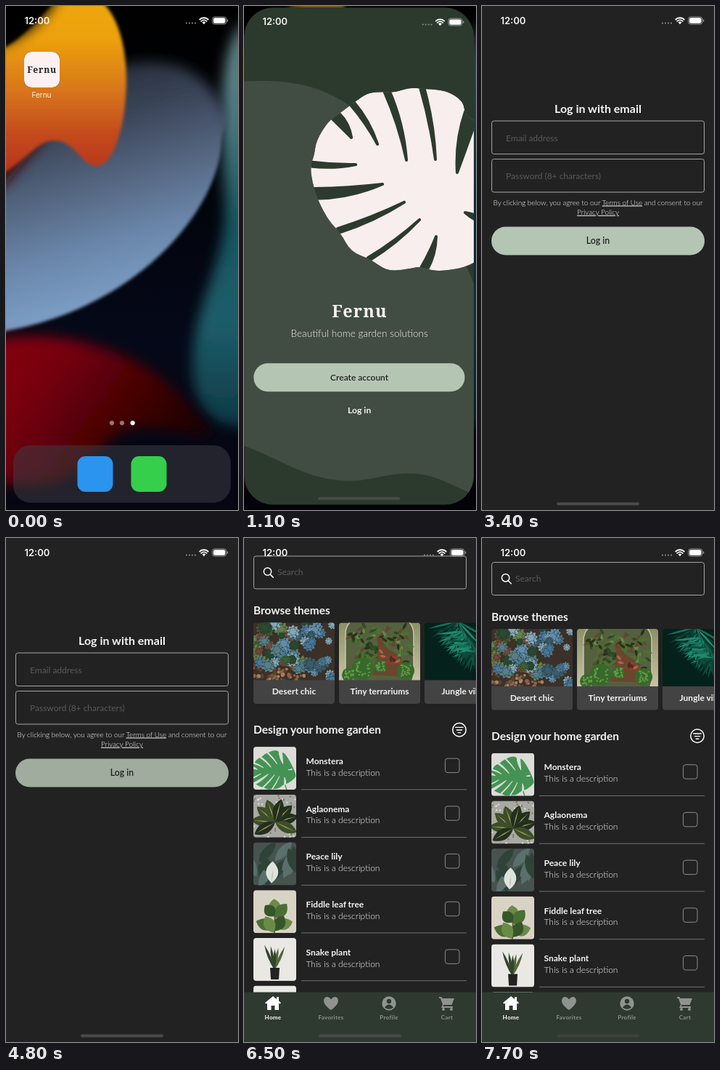
An HTML page that plays this animation: 320 by 693 pixels, repeating every 8000 ms.

```html
<!DOCTYPE html>
<html lang="en">
<head>
<meta charset="utf-8">
<title>Garden app</title>
<style>
html, body { margin: 0; height: 100%; overflow: hidden; background: #000; }
svg#stage { display: block; width: 100vw; height: 100vh; }
text { font-family: Lato, sans-serif; fill: #f4f4f2; }
.mid { text-anchor: middle; }
.bold { font-weight: 700; }
.light { font-weight: 300; }
.serif { font-family: "Noto Serif", serif; font-weight: 600; }
.sys { font-family: Inter, sans-serif; }
.dark { fill: #222; font-weight: 600; }
.hint { fill: #5a5a5a; }
.link { text-decoration: underline; }
.line { fill: none; stroke: #fff; stroke-linecap: round; stroke-linejoin: round; }
</style>
</head>
<body>
<svg id="stage" viewBox="0 0 320 693"></svg>
<script>
const BRAND = 'Fernu';
let seed = 11;
const rnd = (a = 0, b = 1) => a + (b - a) * ((seed = seed * 16807 % 2147483647) / 2147483647);
const pick = list => list[Math.floor(rnd(0, list.length))];
const times = (n, fn) => Array.from({ length: n }, (_, i) => fn(i)).join('');
const text = (x, y, size, cls, s, extra = '') =>
  `<text x="${x}" y="${y}" font-size="${size}" class="${cls}" ${extra}>${s}</text>`;
const rect = (x, y, w, h, fill, r = 0, extra = '') =>
  `<rect x="${x}" y="${y}" width="${w}" height="${h}" rx="${r}" fill="${fill}" ${extra}/>`;
const dot = (x, y, r, fill, extra = '') => `<circle cx="${x}" cy="${y}" r="${r}" fill="${fill}" ${extra}/>`;
const path = (d, fill, extra = '') => `<path d="${d}" fill="${fill}" ${extra}/>`;
const line = (d, width, extra = '') => `<path class="line" d="${d}" stroke-width="${width}" ${extra}/>`;
const at = (x, y, body, extra = '') => `<g transform="translate(${x} ${y})" ${extra}>${body}</g>`;
const blade = (x, y, len, w, angle, fill) =>
  path(`M0 0Q${w} ${-len / 2} 0 ${-len}Q${-w} ${-len / 2} 0 0`, fill, `transform="translate(${x} ${y}) rotate(${angle})"`);
const gradient = (id, dir, ...stops) => `<linearGradient id="${id}" ${dir}>` +
  stops.map((c, i) => `<stop offset="${i / (stops.length - 1)}" stop-color="${c}"/>`).join('') + '</linearGradient>';
const down = 'x1="0" y1="0" x2="0" y2="1"';

// Monstera: a smooth outline cut by tapered slits
const outline = [[249,114],[279,116],[303,131],[305,152],[335,165],[335,340],[310,359],[265,366],[243,358],
  [225,362],[198,365],[174,348],[147,338],[133,312],[117,296],[102,268],[94,243],[91,220],[97,205],
  [99,186],[116,158],[134,146],[151,133],[171,119],[192,118],[208,119],[228,112]];
const smooth = pts => {
  const mid = ([x, y], [u, v]) => `${(x + u) / 2} ${(y + v) / 2}`;
  const next = i => pts[(i + 1) % pts.length];
  return 'M' + mid(pts.at(-1), pts[0]) + pts.map((p, i) => `Q${p} ${mid(p, next(i))}`).join('') + 'Z';
};
const slit = ([x, y, tx, ty, half, bend]) => {
  const len = Math.hypot(tx - x, ty - y), nx = (y - ty) / len, ny = (tx - x) / len;
  const mx = (x + tx) / 2 + nx * bend, my = (y + ty) / 2 + ny * bend;
  const off = (px, py, k) => `${px + nx * half * k} ${py + ny * half * k}`;
  return `M${off(x, y, 1)}Q${off(mx, my, 1)} ${tx} ${ty}Q${off(mx, my, -1)} ${off(x, y, -1)}Z`;
};
const slits = [[314,147,294,229,9,4],[324,293,305,284,3,0],[248,362,265,317,4.5,4],[172,348,242,294,2,5],
  [130,309,221,270,3,5],[98,258,191,245,7,6],[88,217,154,218,3,4],[127,152,148,181,6,-3],
  [149,134,184,190,3,-5],[196,115,224,212,3.5,-7],[245,110,264,211,2.5,-5]].map(slit).join('');
const monstera = (leaf, gap) => path(smooth(outline), leaf) +
  path(slits, gap, `stroke="${gap}" stroke-width="4" stroke-linejoin="round"`);

const status = text(25.5, 24.5, 13, 'sys', '12:00', 'font-weight="600"') +
  times(4, i => dot(249 + i * 4, 23.5, 1.1, '#888')) +
  path('M273 25.2l-2.4-2.7a3.4 3.4 0 0 1 4.8 0z', '#fff') +
  line('M269.2 20.8a5.6 5.6 0 0 1 7.6 0M267.2 18.5a8.6 8.6 0 0 1 11.6 0', 1.8) +
  rect(284.7, 15, 19, 10, 'none', 3, 'stroke="#999"') + rect(286, 16.3, 16.4, 7.4, '#fff', 2) +
  rect(304.8, 18.3, 1.4, 3.4, '#999', .7);

const wallpaper = rect(0, 0, 320, 693, 'url(#night)') +
  path('M330 20C290 60 296 170 302 260S262 400 258 480S290 580 340 578Z', 'url(#teal)', 'filter="url(#blur9)"') +
  '<g filter="url(#blur2)">' +
  path('M-40 250C60 90 170 62 240 84C300 105 330 190 310 250C270 370 120 470 -40 490Z', 'url(#steel)', 'clip-path="url(#edge)" filter="url(#blur9)"') + '</g>' +
  path('M-40 170L70 160L0 245L-40 260Z', '#3a0b0a', 'filter="url(#blur9)"') +
  path('M-30 65C30 60 60 -20 95 -20C150 -20 166 50 166 100C166 160 150 220 125 220C104 220 96 185 66 185C40 185 20 225 -30 243Z', 'url(#orange)', 'filter="url(#blur2)"') +
  path('M-70 -70H95C75 0 40 58 -70 66Z', '#000', 'filter="url(#blur9)"') +
  path('M-30 462C80 435 190 480 240 535C275 575 290 585 275 592C220 585 170 560 130 610C90 660 40 670 -30 650Z', 'url(#red)', 'filter="url(#blur9)"');

const springboard = wallpaper + text(49, 125.5, 10, 'sys mid', BRAND) +
  [146, 160].map(x => dot(x, 573.3, 3.1, '#fff', 'opacity=".45"')).join('') + dot(174.7, 573.3, 3.1, '#fff') +
  rect(10, 604, 300, 79, '#3e4048', 24, 'opacity=".5"') +
  rect(98.5, 619, 49, 49, '#2a94ee', 11) + rect(172.5, 619, 49, 49, '#35cf4b', 11) + status;

const welcome = rect(-5, -5, 330, 710, '#2b3a2d') +
  path('M-5 104C60 100 105 108 150 140C230 200 270 270 325 400V675C285 660 265 643 228 643C195 643 175 654 140 653C80 650 50 622 -5 603Z', '#414c42') +
  `<g clip-path="url(#leaf)">${monstera('#f9eeee', '#2c3b2d')}</g>` +
  text(159.5, 428, 23.5, 'serif mid', BRAND, 'letter-spacing="1.2"') +
  text(159, 455, 13.6, 'light mid', 'Beautiful home garden solutions') +
  rect(13, 491.5, 291.5, 39, '#b5c5b4', 19.5) + text(159, 515.2, 12, 'bold mid dark', 'Create account') +
  text(159, 560.5, 12.2, 'bold mid', 'Log in', 'id="loginLink"');

const field = (y, label) => rect(13.5, y, 293, 45.5, 'none', 3, 'stroke="#a5a5a5"') +
  text(33, y + 27.5, 12, 'hint', label);
const login = rect(0, 0, 320, 693, '#222') + text(160, 146.5, 16, 'bold mid', 'Log in with email') +
  field(158, 'Email address') + field(210.5, 'Password (8+ characters)') +
  text(160, 273.5, 9.9, 'light mid', 'By clicking below, you agree to our <tspan class="link">Terms of Use</tspan> and consent to our') +
  text(160, 286.8, 9.9, 'light mid link', 'Privacy Policy') +
  `<g id="loginButton">${rect(13, 303.5, 294, 39, '#b5c5b4', 19.5)}${text(160, 327.3, 12.3, 'bold mid dark', 'Log in')}</g>`;

const rosette = (x, y, r, fill) => dot(x, y, r * .85, '#26332f') +
  times(9, i => blade(x, y, r, r * .55, i * 40, fill)) +
  times(6, i => blade(x, y, r * .7, r * .4, i * 60 + 20, '#1c2c2c')) +
  times(6, i => blade(x, y, r * .6, r * .4, i * 60 + 20, fill));
const desert = () => rect(0, 0, 112, 80, '#3c3027') +
  times(90, () => dot(rnd(0, 70), rnd(48, 80), rnd(1.5, 3), pick(['#8a6444', '#a98262', '#5d4030', '#6d5341']))) +
  times(70, () => {
    const x = rnd(0, 112), y = rnd(0, 54 + x * .26);
    const blue = rnd(0, 95) < x;
    return rosette(x, y, rnd(5, 11), pick(blue ? ['#628eac', '#4a7899', '#86a8b8', '#3c5d6c'] : ['#3d6336', '#66804d', '#764a38', '#2c4a31', '#587f88']));
  });
const terrarium = () => rect(0, 0, 112, 80, 'url(#jar)') + rect(9, -10, 94, 105, '#55603f', 26, 'stroke="#c9c6ac" stroke-width="1.5"') +
  times(90, () => blade(rnd(14, 98), rnd(8, 54), rnd(7, 15), 4, rnd(0, 360), pick(['#2c4a20', '#4d7031', '#6c8a44', '#283319', '#5d4a30']))) +
  path('M46 72Q58 40 52 22L58 20Q64 37 76 40L86 58L92 74Z', '#6b452e') +
  times(18, () => blade(rnd(58, 88), rnd(40, 68), 9, 4, rnd(0, 360), pick(['#a8654a', '#8f3c2b', '#4a2a20']))) +
  [[33, 63, 15], [57, 60, 9], [92, 66, 12], [14, 72, 10]].map(([x, y, r]) => dot(x, y, r, '#37692a') +
    times(24, () => dot(x + rnd(-r, r) * .65, y + rnd(-r, r) * .65, 1.2, '#66994a'))).join('');
const jungle = () => rect(0, 0, 112, 80, '#04211c') + times(9, i => {
  const a = 120 + i * 17;
  return times(7, k => blade(46 + k * 4, -2 + k * 7, 42 - k * 2, 3, a + k * 4, pick(['#0d4b3b', '#16705a', '#0a382e', '#1f8a6c'])));
});
const card = (i, label, photo) => at(13 + i * 118, 125, photo() + rect(0, 79, 112, 33, '#434343') +
  text(56, 99, 12, 'bold mid', label), 'clip-path="url(#card)"');

const thumbs = [
  () => rect(0, 0, 59, 59, '#dddcd8') + line('M44 24Q40 45 46 59', 1.3, 'style="stroke:#4c8a50"') +
    `<g transform="translate(25 34) rotate(-28) scale(.24 .2) translate(-215 -240)">${monstera('#459354', '#dddcd8')}</g>`,
  () => rect(0, 0, 59, 59, '#a9a9a3') + times(70, () => dot(rnd(0, 59), rnd(0, 59), 1.2, pick(['#d8d8d4', '#77766f']))) +
    [-85, 75, -50, 45, -20, 15, 115, -120].map((a, i) => blade(30, 38, 33, 15, a, i % 2 ? '#222f1e' : '#3c4e29') +
      blade(30, 38, 30, 1.6, a, '#a8985a')).join(''),
  () => rect(0, 0, 59, 59, '#46534f') + times(12, i => blade(rnd(0, 59), rnd(25, 65), 36, 13, rnd(-50, 50), i % 2 ? '#2f4339' : '#5a706c')) +
    blade(25, 56, 30, 17, 3, '#dfe3de') + blade(25, 53, 15, 2, 8, '#c4c9a4'),
  () => rect(0, 0, 59, 59, '#d9d3c6') + line('M29 59L30 22', 2, 'style="stroke:#665a38"') +
    [[30, 32, 20, -5], [30, 38, 25, 40], [29, 36, 20, -40], [30, 50, 25, 75], [29, 52, 27, -70], [30, 56, 24, 30], [28, 58, 25, -28]]
      .map(([x, y, l, a], i) => blade(x, y, l, 16, a, ['#6a8b48', '#4a6f35', '#36552b'][i % 3])).join(''),
  () => rect(0, 0, 59, 59, '#eae8e4') + [-22, 24, -9, 10, 1].map((a, i) => blade(29, 44, 37 - i * 2, 4, a, i % 2 ? '#53663a' : '#31462b')).join('') +
    path('M23 41H36L35 57H24Z', '#222'),
  () => rect(0, 0, 59, 59, '#e9e9e5') + [-70, -35, 0, 35, 70].map(a => blade(29, 45, 34, 15, a, '#4b8a55')).join('')
];
const plants = ['Monstera', 'Aglaonema', 'Peace lily', 'Fiddle leaf tree', 'Snake plant', 'Pothos', 'Calathea', 'Jade plant'];
const row = (name, i) => at(0, 295.7 + i * 65.7,
  at(13, 0, thumbs[i % 6](), 'clip-path="url(#thumb)"') + text(85.5, 23.8, 12, 'bold', name) +
  text(85.5, 39.7, 12, 'light', 'This is a description') + rect(277.5, 16, 19.5, 19.5, 'none', 3.5, 'stroke="#8a8a8a"') +
  rect(79, 58.3, 228, 1, '#707070'));

const icons = [
  c => path('M0 -10L11 -1L9.5 .8L8 -.4V9H2.5V3H-2.5V9H-8V-.4L-9.5 .8L-11 -1Z', c) + rect(5, -9, 3, 6, c),
  c => path('M0 9C-16 -2 -9 -10 -4.5 -9Q-1.5 -8.5 0 -5.5Q1.5 -8.5 4.5 -9C9 -10 16 -2 0 9Z', c),
  c => dot(0, 0, 9.7, c) + dot(0, -3, 3.2, '#2e392f') + path('M-6 5.5Q0 -2.5 6 5.5Q0 10 -6 5.5Z', '#2e392f'),
  c => path('M-11 -9H-7.5L-6.6 -7H10L6.5 2H-4.5L-5.5 4H8V6H-8L-6 1.5L-9 -7H-11Z', c) + dot(-5, 8, 2, c) + dot(6, 8, 2, c)
];
const tab = (label, i) => at(40 + i * 80, 640, icons[i](i ? '#8f938f' : '#fff') +
  text(0, 22, 8, 'bold mid', label, `letter-spacing=".3" style="fill:${i ? '#8f938f' : '#fff'}"`));

const home = rect(0, 0, 320, 693, '#222') + '<g id="list">' +
  rect(13.5, 33.5, 293, 45, 'none', 3, 'stroke="#a5a5a5"') + line('M36.2 58.7L40.2 62.7M37.7 54.7a5.2 5.2 0 1 1 -10.4 0a5.2 5.2 0 1 1 10.4 0', 1.5) +
  text(46, 60, 12, 'hint', 'Search') + text(13, 113.7, 15.4, 'bold', 'Browse themes') +
  card(0, 'Desert chic', desert) + card(1, 'Tiny terrariums', terrarium) + card(2, 'Jungle vibes', jungle) +
  text(13, 277.8, 15.5, 'bold', 'Design your home garden') +
  dot(297, 272.3, 9.2, 'none', 'stroke="#fff" stroke-width="1.5"') + line('M291.8 269H302.2M293.3 272.6H300.7M295.2 276.2H298.8', 1.4) +
  plants.map(row).join('') + '</g>' + rect(0, 624.5, 320, 69, '#2e392f') +
  ['Home', 'Favorites', 'Profile', 'Cart'].map(tab).join('');

const blur = n => `<filter id="blur${n}" x="-20%" y="-20%" width="140%" height="140%"><feGaussianBlur stdDeviation="${n}"/></filter>`;
const clip = (id, body) => `<clipPath id="${id}">${body}</clipPath>`;
document.getElementById('stage').innerHTML = '<defs>' + blur(2) + blur(9) +
  gradient('night', down, '#000', '#02040a', '#050818', '#060611') +
  gradient('teal', down, '#6f9294', '#4c7980', '#185661', '#1c5c68', '#0d3a45') +
  gradient('steel', 'x1=".35" y1="0" x2=".6" y2="1"', '#232a36', '#384255', '#53647e', '#6a86aa', '#7c9fc6', '#7c9fc6') +
  gradient('orange', down, '#f0a80a', '#eba10c', '#d9791a', '#c34a1c', '#b52f1c') +
  gradient('red', 'x1="0" y1="0" x2="1" y2=".5"', '#8a0008', '#760008', '#4a0206', '#1c0106') +
  gradient('jar', down, '#8b9068', '#c9c2a2') +
  clip('edge', path('M-60 -20H310V150Q298 170 297 190C292 275 190 412 0 447L-60 455Z')) +
  clip('leaf', path(smooth(outline))) + clip('card', rect(0, 0, 112, 111.5, '', 4)) + clip('thumb', rect(0, 0, 59, 59, '', 4)) +
  clip('window', '<rect id="frame"/>') + '</defs>' + springboard +
  rect(0, 0, 320, 693, '#000', 0, 'id="shade"') + '<g clip-path="url(#window)"><g id="app">' + rect(0, 0, 320, 693, '#000') +
  `<g id="welcome"><g transform="scale(1.0095 1.0135) translate(0 -2.3)">${welcome}</g></g>` +
  `<g id="login">${login}</g><g id="home">${home}</g>` + status + rect(103, 682.4, 114, 4, '#4a4a4a', 2, 'id="indicator"') + '</g>' +
  `<g id="tile">${rect(0, 0, 49, 130, '#fdf0f0')}${text(24.7, 29.3, 12.2, 'serif mid', BRAND, 'letter-spacing=".8" style="fill:#222"')}` +
  rect(0, 0, 49, 130, '#000', 0, 'id="press"') + '</g></g>';

const el = Object.fromEntries([...document.querySelectorAll('[id]')].map(e => [e.id, e]));
const set = (e, attrs) => { for (const k in attrs) e.setAttribute(k, attrs[k]); };
const span = (t, start, length) => Math.min(1, Math.max(0, (t - start) / length));
const inOut = (u, n) => u < .5 ? (2 * u) ** n / 2 : 1 - (2 - 2 * u) ** n / 2;

function draw(t) {
  // Spring from icon to full screen; rest goes from 1 to 0
  const s = Math.max(0, t - 650) * .0142;
  const rest = t < 1400 ? (1 + s) * Math.exp(-s) : 0;
  const x = 25 * rest, y = 63 * rest ** .75, width = 320 - 271 * rest, height = 693 - 581 * rest - y;
  set(el.frame, { x, y, width, height, rx: Math.min(40, 4000 * rest) * (1 - .75 * rest) });
  set(el.app, { transform: `translate(${x} ${y}) scale(${width / 320} ${height / 693})` });
  set(el.tile, { transform: `translate(${x} ${y}) scale(${width / 49})`, opacity: Math.max(0, 2 * rest - 1) });
  set(el.press, { opacity: t < 500 ? 0 : .3 });
  set(el.shade, { opacity: .5 * (1 - rest) });

  // Each new screen slides over the last, which fades to black
  const first = inOut(span(t, 2950, 453), 3), second = inOut(span(t, 5250, 453), 3);
  set(el.welcome, { opacity: 1 - first });
  set(el.login, { transform: `translate(${320 * (1 - first)})`, opacity: 1 - second });
  set(el.home, { transform: `translate(${320 * (1 - second)})` });
  set(el.loginLink, { opacity: t < 2700 ? 1 : .4 });
  set(el.loginButton, { opacity: t < 4800 ? 1 : .85 });

  const scroll = 120 * inOut(span(t, 6430, 370), 2) * (1 - span(t, 7040, 660)) ** 5;
  set(el.list, { transform: `translate(0 ${-scroll})` });
  set(el.indicator, { opacity: 1 - .5 * span(t, 7000, 300) });
}
function tick() {
  draw(Math.floor(performance.now() % 8000 / 100) * 100); // ten poses a second
  requestAnimationFrame(tick);
}
tick();
</script>
</body>
</html>
```
